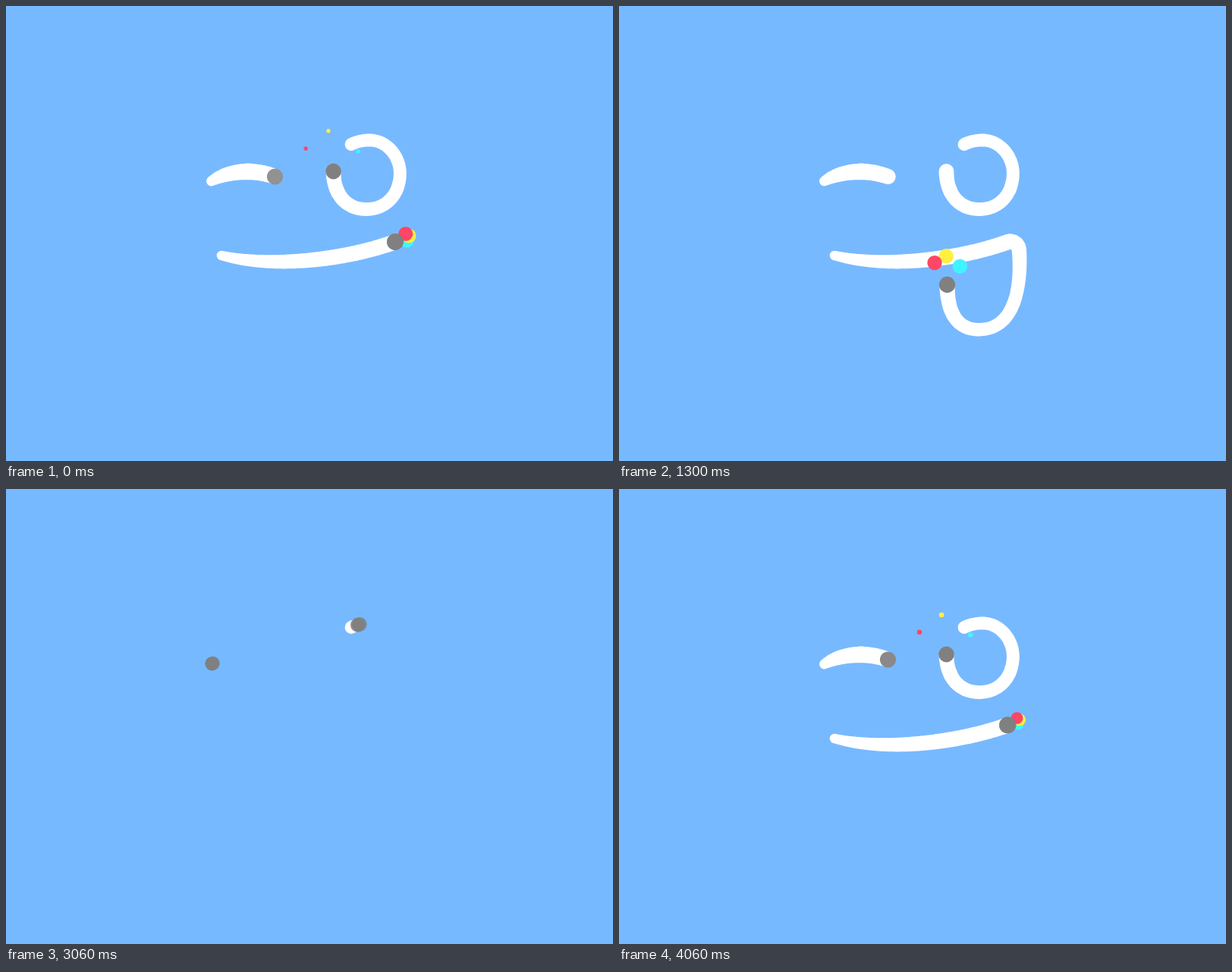
An HTML page with a canvas that plays this animation: 800 px wide and 600 px high, repeating every 4080 ms.

```html
<!DOCTYPE html>
<html lang="en">
<head>
<meta charset="utf-8">
<title>Winking face</title>
<style>
  html, body { margin: 0; width: 100%; height: 100%; overflow: hidden; background: #77b9ff; }
  canvas { display: block; width: 800px; height: 600px; }
  svg { position: absolute; width: 0; height: 0; }
</style>
</head>
<body>
<canvas width="800" height="600"></canvas>
<svg>
  <path id="wink" d="M270.5 231C290 219 322 213 354.5 225"/>
  <path id="eye" d="M455 182.5C464 178 473 177 479 177C501 177 519.3 197 519.3 221
    C519.3 248 501 268 475 268C449 268 431.5 249 431.5 218"/>
  <path id="mouth" d="M284 329C345 345 440 337 513 311"/>
  <path id="tongue" d="M513 311C522 309.5 527 315 527.5 324
    C530.5 372 521 426.7 474 426.7C447 426.7 432.5 406 432.5 367.5"/>
</svg>
<script>
const LOOP = 4080, CYCLE_START = 2760;
const canvas = document.querySelector('canvas');
const ctx = canvas.getContext('2d');

const ramp = (t, a, b) => Math.min(1, Math.max(0, (t - a) / (b - a)));
const inOut = p => p < .5 ? 2 * p * p : 1 - 2 * (1 - p) ** 2;

// Times count on past the loop end: the cycle runs from 2760 to 6840 ms.
// radius: half width along the line; hold and fade: how the pen leaves;
// heading, spread (degrees) and reach shape the confetti.
const strokes = [
  { id: 'wink', start: 3020, end: 3440, hold: 600, fade: 290,
    radius: k => 10.2 - 3.7 * (1 - k) ** 4 + 2.4 * k * (1 - k),
    heading: 2, spread: 64, reach: 58 },
  { id: 'eye', start: 2935, end: 3790, hold: 310, fade: 290,
    radius: k => 8.4 + 1.6 * k ** 3,
    heading: -97, spread: 58, reach: 58 },
  { id: 'mouth', start: 3390, end: 4090, hold: 360, fade: 1,
    radius: k => 10.3 - 4 * (1 - k) ** 3,
    heading: -24, spread: 18, reach: 59 },
  { id: 'tongue', start: 4450, end: 5320, hold: LOOP, fade: 1,
    radius: k => 8.6 + 1.7 * (2 * k - 1) ** 2,
    heading: -92, spread: 37, reach: 74 }
];

const confetti = [
  { color: '#40f4ff', turn: 1, far: .78 },
  { color: '#fff040', turn: 0, far: 1 },
  { color: '#ff4667', turn: -.75, far: .88 }
];

for (const s of strokes) {
  s.line = document.getElementById(s.id);
  s.length = s.line.getTotalLength();
}

const pointAt = (s, k) => s.line.getPointAtLength(k * s.length);
const progress = (s, t) => inOut(ramp(t, s.start, s.end));

function disc(x, y, r) {
  ctx.beginPath();
  ctx.arc(x, y, r, 0, 2 * Math.PI);
  ctx.fill();
}

// White line, swept by a disc of changing radius.
function drawStroke(s, t) {
  const done = progress(s, t);
  if (!done) return;
  const steps = Math.ceil(done * s.length);
  ctx.fillStyle = '#fff';
  ctx.beginPath();
  for (let i = 0; i <= steps; i++) {
    const k = done * i / steps, p = pointAt(s, k), r = s.radius(k);
    ctx.moveTo(p.x + r, p.y);
    ctx.arc(p.x, p.y, r, 0, 2 * Math.PI);
  }
  ctx.fill();
}

function drawBurst(s, t) {
  const u = (t - s.end + 130) / 560;
  if (u <= 0 || u >= .9) return;
  const r = Math.min(44 * u, 9.7, 18 * (.9 - u));
  const from = pointAt(s, 1);
  for (const c of confetti) {
    const angle = (s.heading + c.turn * s.spread) * Math.PI / 180;
    const d = s.reach * c.far * Math.sin(u * Math.PI / 2);
    ctx.fillStyle = c.color;
    disc(from.x + d * Math.cos(angle), from.y + d * Math.sin(angle), r);
  }
}

// Grey pen at the tip of the line, blurred along its motion.
function drawPen(s, t) {
  const size = ramp(t, s.start - 100, s.start);
  const leave = s.end + s.hold;
  const alpha = 1 - ramp(t, leave, leave + s.fade);
  if (!size || !alpha) return;
  const k = progress(s, t);
  const r = size * Math.max(9, s.radius(k) + .4 + 12 * k * (1 - k));
  const moving = t > s.start && t < s.end;
  const blur = moving ? 4 : 0;
  ctx.fillStyle = '#808080';
  ctx.globalAlpha = moving ? .4 : alpha;
  for (let i = -blur; i <= blur; i++) {
    const p = pointAt(s, progress(s, t + i * 3));
    disc(p.x, p.y, r);
  }
  ctx.globalAlpha = 1;
}

function render(ms) {
  const now = ms % LOOP;
  const t = now < CYCLE_START ? now + LOOP : now;
  ctx.clearRect(0, 0, 800, 600);
  for (const draw of [drawStroke, drawBurst, drawPen]) {
    for (const s of strokes) draw(s, t);
  }
  canvas.style.opacity = 1 - inOut(ramp(t, 6280, 6820));
}

const began = performance.now();
function tick() {
  render(performance.now() - began);
  requestAnimationFrame(tick);
}
tick();
</script>
</body>
</html>
```
